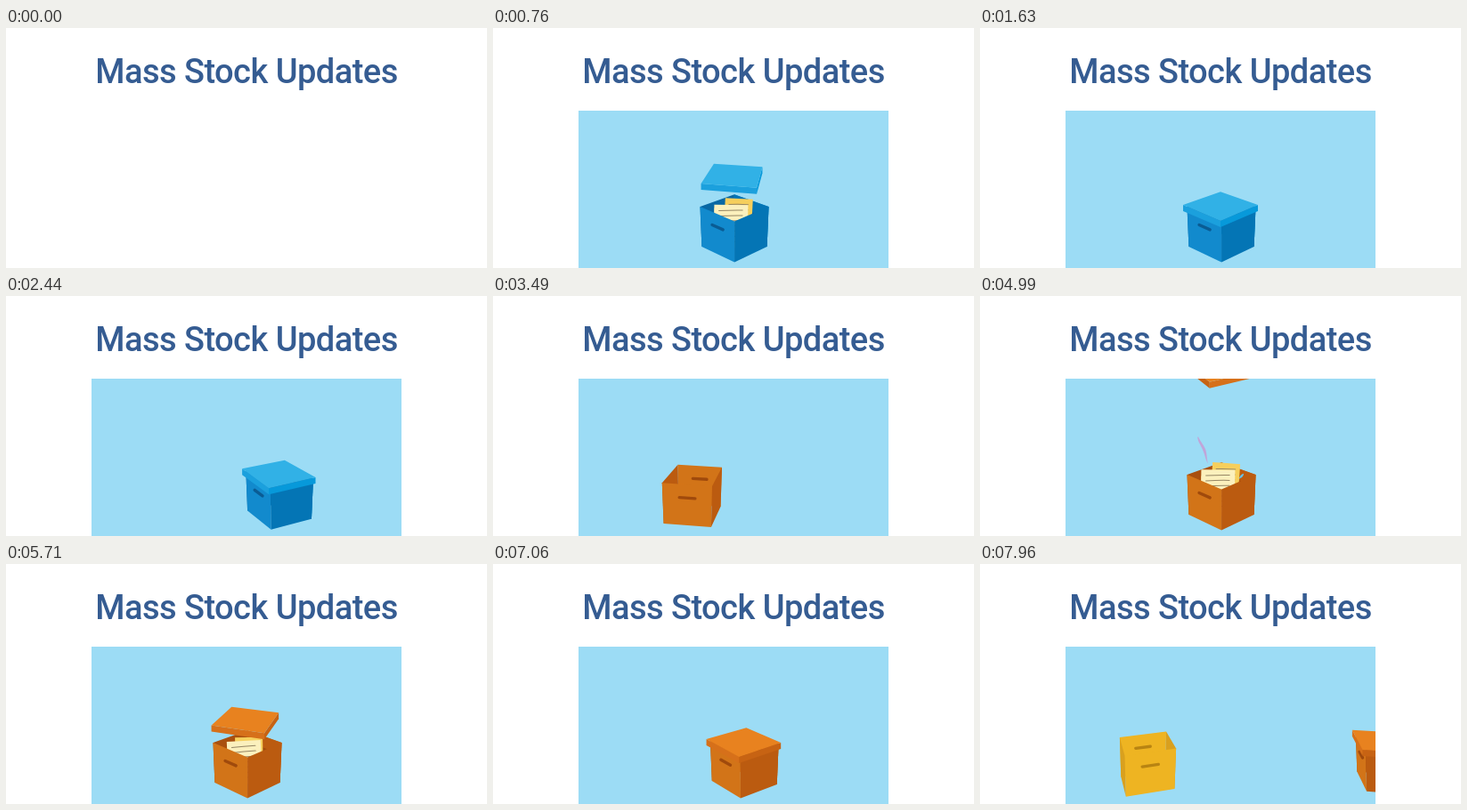
Write an HTML page with a canvas that moves like this. It is 540x270 px and loops after 7990 ms.

```html
<!DOCTYPE html>
<html lang="en">
<head>
<meta charset="utf-8">
<title>Mass Stock Updates</title>
<style>
  html, body { margin: 0; width: 100%; height: 100%; overflow: hidden; background: #fff; }
  canvas, svg { position: absolute; left: 0; top: 0; width: 540px; height: 270px; }
  text { font: 500 38px Roboto, "Open Sans", sans-serif; letter-spacing: -.55px; fill: #355c92; }
</style>
</head>
<body>
<canvas id="stage" width="540" height="270"></canvas>
<svg viewBox="0 0 540 270"><text x="270" y="62" text-anchor="middle">Mass Stock Updates</text></svg>
<script>
const ctx = document.getElementById('stage').getContext('2d');
const LOOP = 7990, BOX_PERIOD = 4830, MIDDLE = 270;

const palettes = [
  { light: '#128acd', dark: '#0475b5', deep: '#0968a4', slot: '#0a5c94', lid: '#31b1e6', rimLight: '#1ba0dd', rimDark: '#0799da' },
  { light: '#d27418', dark: '#bb5b10', deep: '#a9500f', slot: '#a04a0c', lid: '#e8821f', rimLight: '#d6701a', rimDark: '#c76313' },
  { light: '#eeb422', dark: '#d9a01e', deep: '#d0981c', slot: '#b88412', lid: '#f6c63c', rimLight: '#e6ae22', rimDark: '#d59c1c' }
];

// Motion tracks: [time within a box's life, value...]
const boxTrack = [ // x, yaw
  [2500, 45, -80], [2800, 125, -50], [3130, 187, -20], [3490, 225, 9], [3900, 254, 30], [4360, 268, 42],
  [4700, 271, 45], [6750, 271, 45], [7000, 278, 50], [7270, 306, 62], [7360, 322, 67], [7960, 456, 100], [8250, 525, 115]
];
const lidTrack = [ // y, yaw
  [4950, 72, -32], [5250, 125, -14], [5590, 165, 10], [5710, 174, 19], [5900, 190, 35], [6080, 199, 45], [6200, 199, 45]
];
const sheets = [ // track: x, y, rotation
  { color: '#f6cf5c', w: 21, grow: 10, h: 50, track: [[4040, 368, 60, 60], [4360, 327, 126, 33], [4650, 290, 180, 15], [4900, 275, 212, 4], [5590, 275, 217, 3], [5710, 273, 220, -1]] },
  { color: '#f5dd8f', w: 35, grow: 0, h: 45, track: [[3850, 222, 60, -45], [4360, 246, 163, -23], [4700, 264, 222, -4], [5000, 266, 225, 0]] },
  { color: '#fbf0bd', w: 33, grow: 5, h: 48, track: [[4000, 288, 60, 25], [4360, 268, 139, 2], [4650, 267, 188, -3], [4950, 267, 219, 1], [5590, 267, 223, 1], [5710, 268, 223, -3]] }
];
const ribbons = [
  { start: 3960, color: '#e3cf76', width: 4, path: [172, 93, 215, 140, 262, 205] },
  { start: 3960, color: '#f0b925', width: 6, path: [446, 124, 345, 150, 280, 205] },
  { start: 4310, color: '#c0a5d9', width: 3, path: [235, 92, 236, 150, 265, 205] },
  { start: 4140, color: '#68c3e6', width: 2.5, path: [353, 104, 352, 140, 290, 205] }
];

const clamp = v => Math.max(0, Math.min(1, v));

// Hermite interpolation that stays flat where a track rests.
function sample(track, time, column) {
  const last = track.length - 1;
  if (time <= track[0][0]) return track[0][column];
  if (time >= track[last][0]) return track[last][column];
  const i = track.findIndex(k => k[0] > time) - 1;
  const slope = j => (track[j + 1][column] - track[j][column]) / (track[j + 1][0] - track[j][0]);
  const tangent = j => {
    if (j === 0) return slope(0);
    if (j === last) return slope(last - 1);
    const a = slope(j - 1), b = slope(j);
    return a * b <= 0 ? 0 : 2 * a * b / (a + b);
  };
  const span = track[i + 1][0] - track[i][0], p = (time - track[i][0]) / span, q = 1 - p;
  return track[i][column] * (1 + 2 * p) * q * q + track[i + 1][column] * p * p * (3 - 2 * p)
    + span * (tangent(i) * p * q * q - tangent(i + 1) * p * p * q);
}

// Corners of a horizontal square seen from above with mild perspective.
function square(cx, cy, radius, yaw, tilt) {
  return [0, 1, 2, 3].map(i => {
    const angle = (yaw + 45 + 90 * i) * Math.PI / 180;
    const z = radius * Math.sin(angle), scale = 1 + .0024 * z;
    return [MIDDLE + (cx + radius * Math.cos(angle) - MIDDLE) * scale, cy + z * tilt * scale];
  });
}

function fill(points, color) {
  ctx.fillStyle = color;
  ctx.beginPath();
  points.forEach(p => ctx.lineTo(p[0], p[1]));
  ctx.closePath();
  ctx.fill();
}

const mix = (a, b, p) => [a[0] + (b[0] - a[0]) * p, a[1] + (b[1] - a[1]) * p];
const isNear = (top, i) => top[i][0] > top[(i + 1) % 4][0];
const side = (top, bottom, i) => [top[i], top[(i + 1) % 4], bottom[(i + 1) % 4], bottom[i]];

function drawSlot([a, b, c, d], color) {
  const left = mix(a, d, .33), right = mix(b, c, .33);
  ctx.strokeStyle = color;
  ctx.lineWidth = 3.4;
  ctx.lineCap = 'round';
  ctx.beginPath();
  ctx.moveTo(...mix(left, right, .34));
  ctx.lineTo(...mix(left, right, .66));
  ctx.stroke();
}

function drawWalls(top, bottom, near, yaw, colors) {
  for (let i = 0; i < 4; i++) {
    if (isNear(top, i) !== near) continue;
    const wall = side(top, bottom, i);
    fill(wall, i % 2 ? (near || yaw < 25 ? colors.dark : colors.deep) : colors.light);
    if (i % 2) continue;
    if (!near) {
      ctx.globalAlpha = clamp((yaw - 12) / 28);
      fill(wall, colors.dark);
      ctx.globalAlpha = 1;
    }
    drawSlot(wall, colors.slot);
  }
}

function drawSheet(sheet, time) {
  const { track, color, h } = sheet;
  if (time < track[0][0]) return;
  const [x, y, turn] = [1, 2, 3].map(c => sample(track, time, c));
  const w = sheet.w + sheet.grow * clamp((time - 4360) / 450);
  const wave = 4 * clamp((5000 - time) / 500);
  ctx.save();
  ctx.translate(x, y);
  ctx.rotate(turn * Math.PI / 180);
  ctx.fillStyle = color;
  ctx.beginPath();
  ctx.moveTo(-w / 2, -h / 2);
  ctx.quadraticCurveTo(0, -h / 2 - wave, w / 2, -h / 2);
  ctx.bezierCurveTo(w / 2 - wave, -h / 6, w / 2 - wave, h / 6, w / 2, h / 2);
  ctx.quadraticCurveTo(0, h / 2 - wave / 2, -w / 2, h / 2);
  ctx.bezierCurveTo(-w / 2 - wave, h / 6, -w / 2 + wave, -h / 6, -w / 2, -h / 2);
  ctx.fill();
  ctx.strokeStyle = '#968765';
  ctx.lineWidth = 1;
  for (let row = 1; row < 8; row++) {
    const ly = -h / 2 + row * h / 8.2;
    ctx.beginPath();
    ctx.moveTo(-w * .36, ly + 1);
    ctx.quadraticCurveTo(0, ly - wave / 2, w * .34, ly);
    ctx.stroke();
  }
  ctx.restore();
}

function drawRibbon({ start, color, width, path }, time) {
  const head = clamp((time - start) / 800), tail = clamp((time - start - 420) / 450);
  if (head <= tail) return;
  const [x0, y0, x1, y1, x2, y2] = path, upper = [], lower = [];
  for (let i = 0; i <= 24; i++) {
    const p = tail + (head - tail) * i / 24, q = 1 - p;
    const dx = q * (x1 - x0) + p * (x2 - x1), dy = q * (y1 - y0) + p * (y2 - y1);
    const length = Math.hypot(dx, dy);
    const half = width / 2 * Math.sin(Math.PI * (.12 + .88 * i / 24)), wobble = Math.sin(p * 24);
    const x = q * q * x0 + 2 * p * q * x1 + p * p * x2;
    const y = q * q * y0 + 2 * p * q * y1 + p * p * y2;
    upper.push([x - dy / length * (wobble + half), y + dx / length * (wobble + half)]);
    lower.unshift([x - dy / length * (wobble - half), y + dx / length * (wobble - half)]);
  }
  fill(upper.concat(lower), color);
}

function drawLid(time, boxX, boxYaw, colors) {
  if (time < lidTrack[0][0]) return;
  const y = sample(lidTrack, time, 1);
  const yaw = sample(lidTrack, time, 2) + boxYaw - 45;
  const top = square(boxX - 1, y, 42, yaw, .39);
  const bottom = top.map(p => [p[0], p[1] + 7]);
  for (let i = 0; i < 4; i++) {
    if (isNear(top, i)) fill(side(top, bottom, i), i % 2 ? colors.rimDark : colors.rimLight);
  }
  fill(top, colors.lid);
}

function drawBox(time, colors) {
  if (time < 2500 || time > 8250) return;
  const x = sample(boxTrack, time, 1), yaw = sample(boxTrack, time, 2);
  const top = square(x, 201, 38.5, yaw, .39);
  const bottom = square(x, 246, 36.6, yaw, .44);
  drawWalls(top, bottom, false, yaw, colors);
  if (time < 6100) {
    ribbons.forEach(r => drawRibbon(r, time));
    sheets.forEach(s => drawSheet(s, time));
  }
  drawWalls(top, bottom, true, yaw, colors);
  drawLid(time, x, yaw, colors);
}

function draw(time) {
  ctx.clearRect(0, 0, 540, 270);
  if (time < 100) return;
  ctx.save();
  ctx.beginPath();
  ctx.rect(96, 93, 348, 177);
  ctx.clip();
  ctx.fillStyle = '#9cdcf5';
  ctx.fillRect(96, 93, 348, 177);
  palettes.forEach((colors, i) => drawBox(time - (i - 1) * BOX_PERIOD, colors));
  ctx.restore();
}

const begin = performance.now();
function tick() {
  draw((performance.now() - begin) % LOOP);
  requestAnimationFrame(tick);
}
tick();
</script>
</body>
</html>
```
